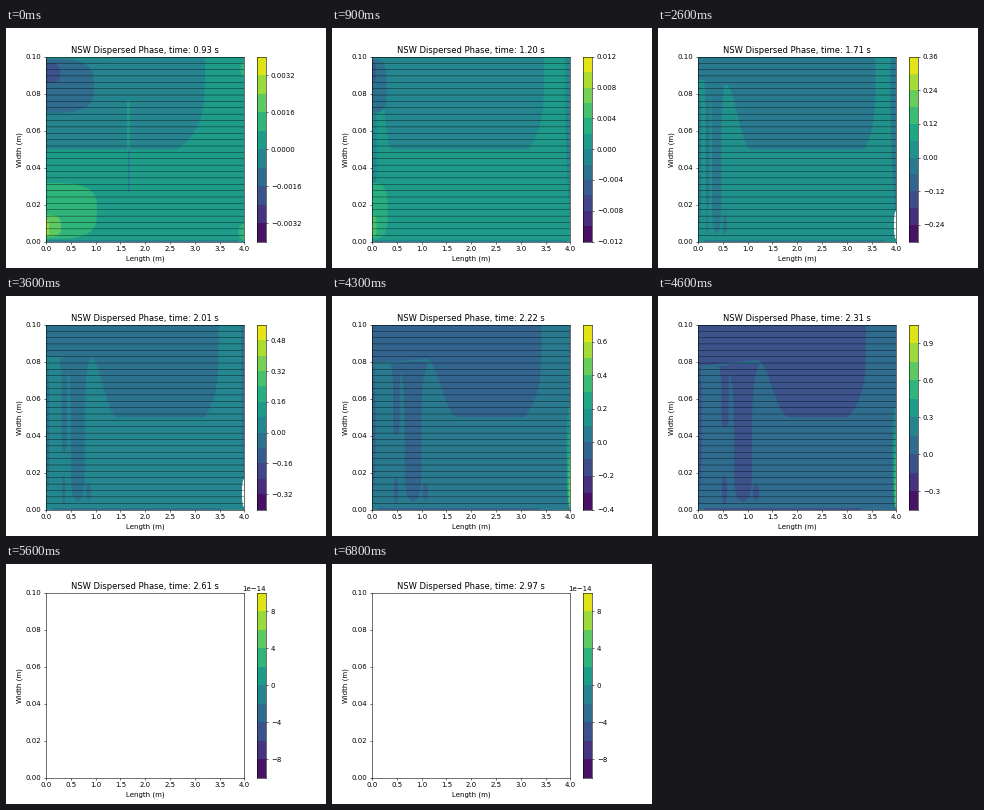
Write a matplotlib script that moves like this. It is 320 px wide and 240 px high and loops after 6900 ms.

```python
import numpy as np
import matplotlib.pyplot as plt
from matplotlib.animation import FuncAnimation
from matplotlib.patches import Polygon
from matplotlib.ticker import MaxNLocator

FRAMES, STEP_MS = 69, 100
BLANK_FROM = 48          # the solution is lost from here on
LEFT, RIGHT, TOP, BOTTOM = 40, 238.4, 28.8, 213.6
MIDDLE = (TOP + BOTTOM) / 2

# growth of the extreme values
GROWTH = [0, 7, 16, 26, 36, 42, 46]
HIGH = [0.0038, 0.0042, 0.29, 0.33, 0.50, 0.53, 0.95]
LOW = [0.0038, 0.0042, 0.29, 0.27, 0.33, 0.34, 0.40]
locator = MaxNLocator(11, steps=[1, 1.5, 2, 2.5, 3, 4, 5, 6, 8, 10])

fig = plt.figure(figsize=(6.4, 4.8), dpi=50)
ax = fig.add_axes([0.125, 0.11, 0.62, 0.77])
cax = fig.add_axes([0.78375, 0.11, 0.028875, 0.77])
ax.set(xlim=(0, 4), ylim=(0, 0.1), xlabel="Length (m)", ylabel="Width (m)")
title = ax.set_title("")
drawn = []


def track(n, start, formed, end):
    """Value that runs from the start, to the formed arch, to the last flow."""
    return np.interp(n, [0, 16, 46], [start, formed, end])


def smooth(u):
    return u**3 * (10 - 15 * u + 6 * u**2)


def fill(x, y, color):
    """Fill an outline given in stage pixels."""
    xy = np.column_stack([(np.array(x) - LEFT) / (RIGHT - LEFT) * 4,
                          (BOTTOM - np.array(y)) / (BOTTOM - TOP) * 0.1])
    drawn.append(ax.add_patch(Polygon(xy, fc=color, lw=0)))


def box(x0, y0, x1, y1, color):
    fill([x0, x1, x1, x0], [y0, y0, y1, y1], color)


def blob(cx, cy, rx, ry, color, power=1.0):
    """Ellipse; a power below one makes it squarer."""
    t = np.linspace(0, 2 * np.pi, 49)
    c, s = np.cos(t), np.sin(t)
    fill(cx + rx * np.sign(c) * abs(c)**power,
         cy + ry * np.sign(s) * abs(s)**power, color)


def plume(cx, half, top, bottom, color):
    """Hanging column, flared at the top and rounded below."""
    s = np.linspace(0, 1, 40)
    w = half * (1 + 0.8 * (1 - s)**8) * np.sqrt(1 - s**16)
    y = top + (bottom - top) * s
    fill(np.r_[cx - w, (cx + w)[::-1]], np.r_[y, y[::-1]], color)


def canopy(n, color):
    """Upper layer: arch on the left, flat underside, steep right flank."""
    u = np.linspace(0, 1, 30)
    peak, foot = track(n, 40, 52, 98), track(n, 40, 75, 134)
    peak_y = track(n, 53, 53, 64)
    right_foot, shoulder = track(n, 172, 215, 190), track(n, 199, 222, 208)
    arch_x = peak + (foot - peak) * u
    arch_y = peak_y + (MIDDLE - peak_y) * smooth(u**0.9)
    flank_x = right_foot + (shoulder - right_foot) * (1 - (1 - u)**4)
    flank_y = MIDDLE - 85 * u
    fill(np.r_[LEFT, LEFT, arch_x, flank_x, shoulder],
         np.r_[TOP, track(n, 42, 42, 70), arch_y, flank_y, TOP], color)


def early_lobes(n, band):
    """First patches at the inlet, shrinking towards the wall."""
    fade = 1 - n / 13
    for k, cy, reach, ry in [(-2, 58, 48, 27), (-3, 45, 14, 10), (1, 183, 51, 28),
                             (2, 198, 15, 11), (3, 200, 3, 8)]:
        blob(LEFT, cy, reach * fade, ry, band(k), 0.6)
    if n < 8:
        box(121, 72, 124, MIDDLE, band(0))
        box(122, MIDDLE, 124, 165, band(-1))
        box(LEFT, TOP, 100, TOP + 1.5, band(1))
        blob(RIGHT, 41, 4, 7, band(1))
        blob(RIGHT, 204, 6, 8, band(1))


def outlet(n, band):
    """Stripe and hot spot along the right wall."""
    y = np.linspace(TOP, 195, 20)
    width = track(n, 0, 9, 0) * (1 - ((y - TOP) / (195 - TOP))**3)
    fill(np.r_[RIGHT - width, RIGHT], np.r_[y, TOP], band(-1))
    if n >= 40:
        for k in range(4):
            top = 110 + 24 * k
            blob(RIGHT, (top + 212) / 2, 4 - 0.9 * k, (212 - top) / 2, band(k + 1), 0.7)
    elif n >= 10:
        blob(RIGHT, 197, 2.4, 14, "white", 0.8)


def draw_field(n, band):
    low = band(-1)
    box(LEFT, TOP, RIGHT, BOTTOM, band(0))
    canopy(n, low)
    plume(track(n, 40, 45.5, 85), track(n, 0, 2.5, 9), track(n, 45, 45, 68), 206, low)
    plume(track(n, 40, 41, 67), track(n, 0, 1, 3.5), track(n, 45, 45, 70),
          track(n, 206, 206, 132), low)
    blob(track(n, 40, 51.5, 98), 196, track(n, 0, 2, 3), track(n, 0, 11, 8), low)
    blob(track(n, 40, 40, 66.5), 194, track(n, 0, 0, 2.5), 14, low)
    blob(42, 130, track(n, 0, 1.2, 1.5), 65, low)
    box(track(n, 40, 46, 46), BOTTOM - 2, track(n, 232, 238, 203), BOTTOM, low)
    if n < 13:
        early_lobes(n, band)
    outlet(n, band)
    rows = np.linspace(0, 0.1, 30)[1:-1]
    drawn.append(ax.hlines(rows, 0, 4, color="black", lw=0.6, alpha=0.85, snap=False))


def draw_scale(n):
    """Redraw the colour bar; return a lookup of band colours counted from zero."""
    if n < BLANK_FROM:
        high, low = (np.exp(np.interp(n, GROWTH, np.log(v))) for v in (HIGH, LOW))
    else:
        high = low = 0.95e-13
    levels = locator.tick_values(-low, high)
    count, zero = len(levels) - 1, np.argmin(abs(levels))
    cax.clear()
    cax.pcolormesh([0, 1], levels, np.arange(count)[:, None],
                   cmap="viridis", vmin=-0.5, vmax=count - 0.5)
    cax.set(xlim=(0, 1), ylim=(levels[0], levels[-1]), xticks=[])
    cax.yaxis.tick_right()
    cax.set_yticks(levels[zero % 2::2])
    return lambda k: plt.cm.viridis((np.clip(zero + k, 0, count - 1) + 0.5) / count)


def update(n):
    while drawn:
        drawn.pop().remove()
    title.set_text(f"NSW Dispersed Phase, time: {0.93 + 0.03 * n:.2f} s")
    band = draw_scale(n)
    if n < BLANK_FROM:
        draw_field(n, band)
    return []


anim = FuncAnimation(fig, update, frames=FRAMES, interval=STEP_MS,
                     init_func=lambda: [], repeat=True, repeat_delay=0)
plt.show()
```
